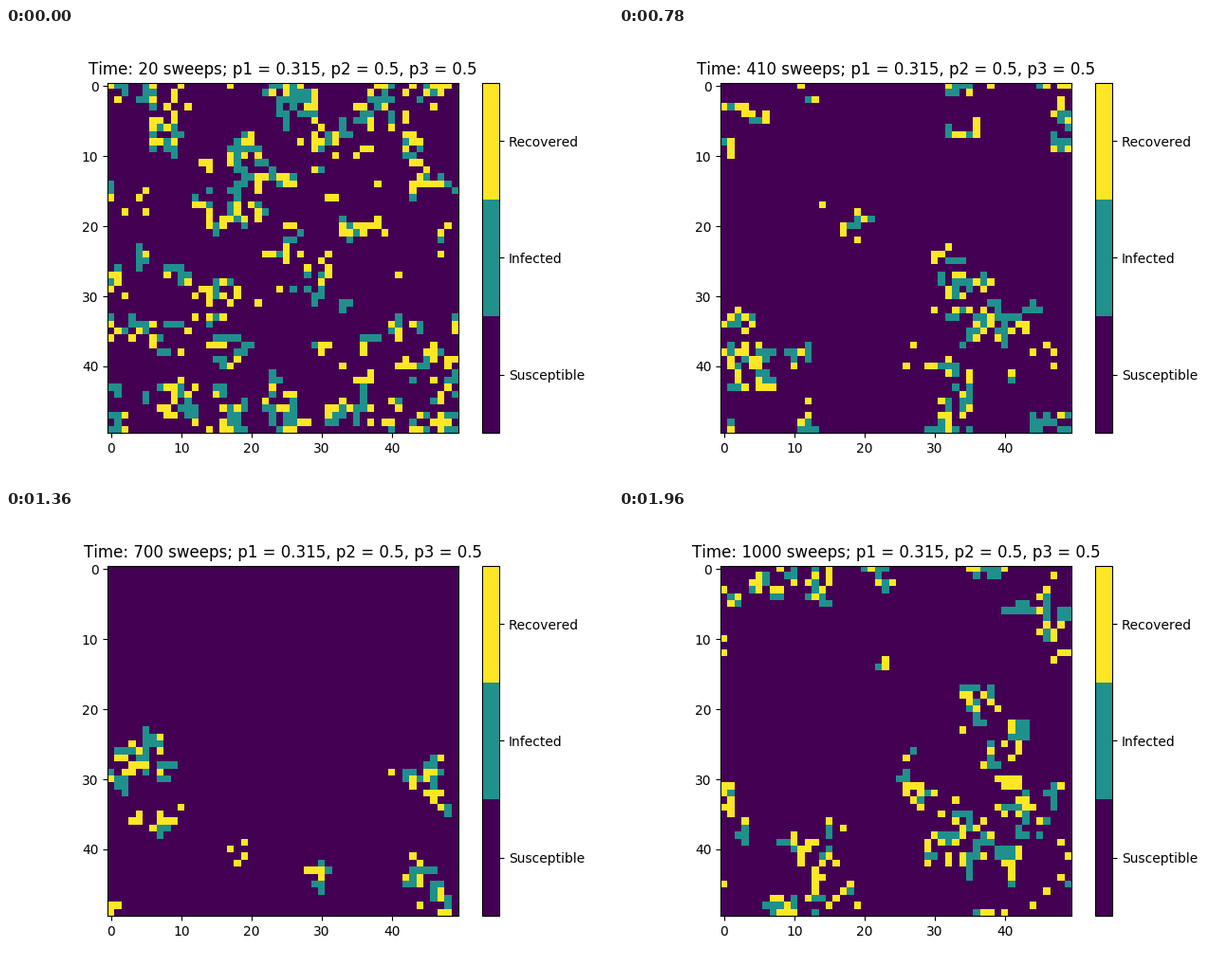
Animation, 640 px wide and 480 px high, one loop 1.98 s. Source, as a matplotlib script:

```python
import numpy as np
import matplotlib.pyplot as plt
from matplotlib.animation import FuncAnimation

SIZE = 50
P1, P2, P3 = 0.315, 0.5, 0.5
FIRST, LAST, STRIDE = 20, 1000, 10
SUSCEPTIBLE, INFECTED, RECOVERED = range(3)


def neighbours():
    """Four nearest sites of every site on the periodic lattice."""
    ids = np.arange(SIZE * SIZE).reshape(SIZE, SIZE)
    rolled = [np.roll(ids, s, axis).ravel() for axis in (0, 1) for s in (1, -1)]
    return list(zip(*(r.tolist() for r in rolled)))


def sweep(grid, near, rng):
    """One sweep of random sequential S -> I -> R -> S updates."""
    n = len(grid)
    for k, u in zip(rng.integers(n, size=n).tolist(), rng.random(n).tolist()):
        state = grid[k]
        if state == SUSCEPTIBLE:
            if u < P1:
                a, b, c, d = near[k]
                if INFECTED in (grid[a], grid[b], grid[c], grid[d]):
                    grid[k] = INFECTED
        elif state == INFECTED:
            if u < P2:
                grid[k] = RECOVERED
        elif u < P3:
            grid[k] = SUSCEPTIBLE


def simulate(seed):
    rng = np.random.default_rng(seed)
    near = neighbours()
    grid = rng.integers(3, size=SIZE * SIZE).tolist()
    history = []
    for t in range(1, LAST + 1):
        sweep(grid, near, rng)
        if t >= FIRST and t % STRIDE == 0:
            history.append(np.array(grid).reshape(SIZE, SIZE))
    return history


def lowest_infection(history):
    return min(np.count_nonzero(grid == INFECTED) for grid in history)


def caption(i):
    return f"Time: {FIRST + STRIDE * i} sweeps; p1 = {P1}, p2 = {P2}, p3 = {P3}"


# Near the epidemic threshold a run can die out, so keep the hardiest one.
history = max(map(simulate, range(3)), key=lowest_infection)

plt.rcParams["text.kerning_factor"] = 6
fig, ax = plt.subplots(figsize=(6.4, 4.8), dpi=100)
image = ax.imshow(history[0], cmap=plt.get_cmap("viridis", 3), vmin=-0.5, vmax=2.5)
bar = fig.colorbar(image, ax=ax, ticks=[SUSCEPTIBLE, INFECTED, RECOVERED])
bar.ax.set_yticklabels(["Susceptible", "Infected", "Recovered"])
title = ax.set_title(caption(0))


def draw(i):
    image.set_data(history[i])
    title.set_text(caption(i))
    return image, title


anim = FuncAnimation(fig, draw, frames=len(history), interval=20, repeat=True)
plt.show()
```
